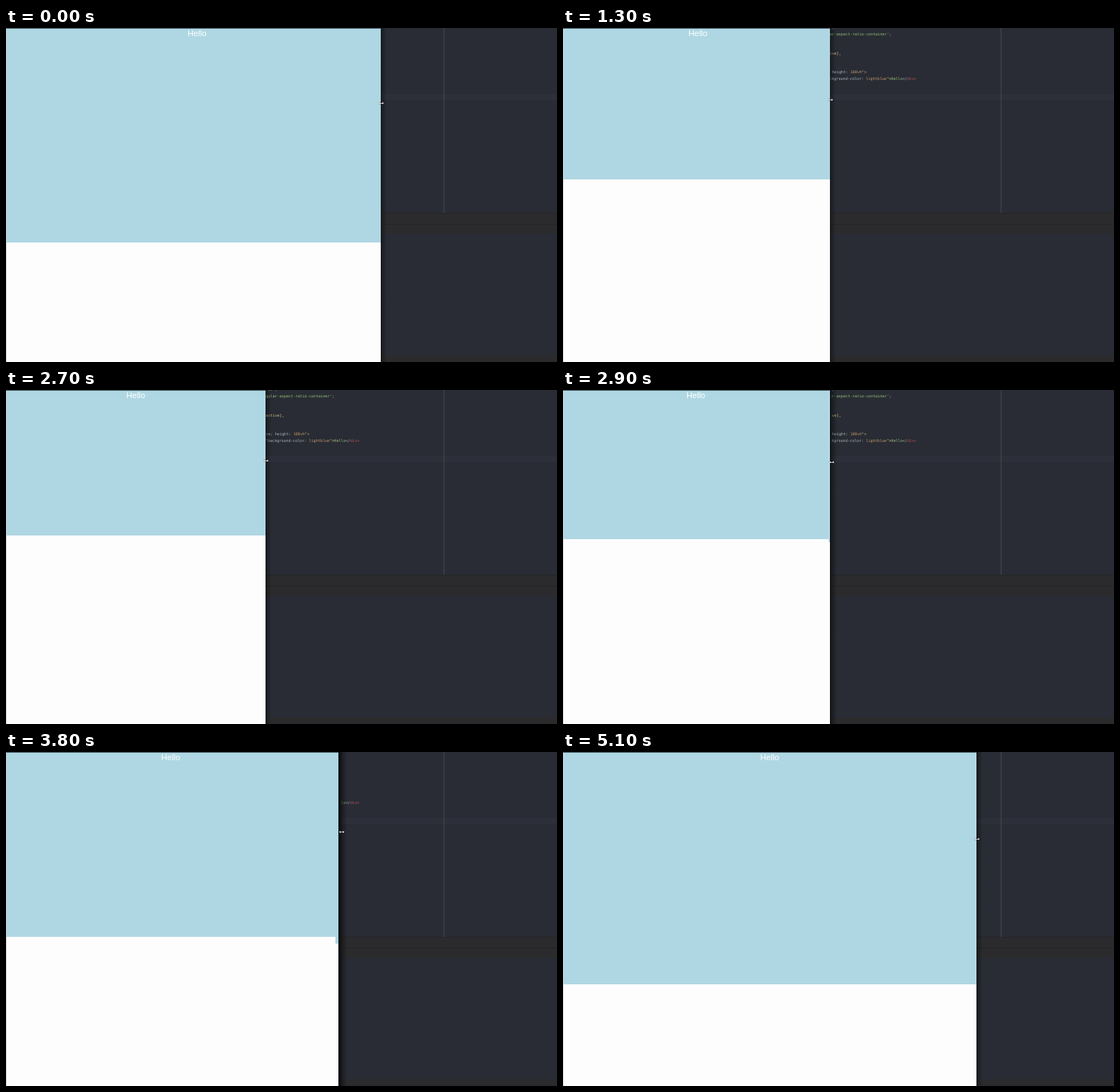
An HTML page with a canvas for the animation above (5.2 s loop, 741 by 450 pixels).

```html
<!DOCTYPE html>
<html>
<head>
<meta charset="utf-8">
<style>
  html, body { margin: 0; overflow: hidden; }
  canvas { display: block; }
</style>
</head>
<body>
<canvas id="stage" width="741" height="450"></canvas>
<script>
const ctx = document.getElementById('stage').getContext('2d');
const LOOP = 5200, STEP = 100;

// [time, x] of the page edge and [time, y] of the pointer
const edgeKeys = [[-100, 514], [0, 504], [400, 458], [500, 446], [1000, 387], [1200, 363], [1300, 359],
  [1500, 353], [1800, 349], [2700, 349], [3000, 364], [3300, 387], [3600, 424], [4200, 493],
  [4300, 497], [4800, 546], [5000, 555.5], [5100, 556]];
const pointerKeys = [[0, 101], [500, 102], [1300, 96.5], [1800, 95], [2700, 95], [3300, 101], [4300, 114], [5100, 117]];

const GREY = '#abb2bf', GREEN = '#98c379', ORANGE = '#c59a6c', YELLOW = '#d9c08a', RED = '#b8525c';
// Each line: right end, vertical centre, then coloured parts
const code = [
  [364.5, -0.5, ["or';", GREEN]],
  [441.7, 8.3, ["gular-aspect-ratio-container'", GREEN], [';', GREY]],
  [374, 33.8, ['active],', YELLOW]],
  [408, 59.2, ['ve; height: ', GREY], ['100vh', ORANGE], ['">', YELLOW]],
  [475.3, 68, ['"', GREEN], ['background-color: ', GREY], ['lightblue', ORANGE], ['">', YELLOW], ['Hello', GREEN], ['</', GREY], ['div>', RED]]
];

function at(keys, t) {
  const i = keys.findIndex(k => k[0] >= t);
  if (i < 0) return keys[keys.length - 1][1];
  if (i === 0) return keys[0][1];
  const [t0, a] = keys[i - 1], [t1, b] = keys[i];
  return a + (b - a) * (t - t0) / (t1 - t0);
}

function rect(color, x, y, w, h) {
  ctx.fillStyle = color;
  ctx.fillRect(x, y, w, h);
}

function drawEditor() {
  rect('#292c34', 0, 0, 741, 450);
  rect('#2d2f3a', 0, 89, 741, 8);
  rect('#484a50', 588.6, 0, 1, 249);
  rect('#2b2b2d', 0, 249, 741, 28);
  rect('#242527', 0, 249, 741, 1);
  rect('#232426', 0, 264, 741, 1);
  rect('#2b2b2d', 0, 441, 741, 9);
  ctx.font = '5.13px "DejaVu Sans Mono", monospace';
  ctx.textAlign = 'right';
  ctx.textBaseline = 'alphabetic';
  for (const [right, y, ...parts] of code) {
    let x = right;
    for (const [text, color] of parts.reverse()) {
      ctx.fillStyle = color;
      ctx.fillText(text, x, y + 1.8);
      x -= ctx.measureText(text).width;
    }
    parts.reverse();
  }
}

function drawPage(edge, growth) {
  const gap = growth > 0 ? growth * 0.35 : growth;
  const content = edge - gap, height = content * 9 / 16;
  const frame = edge + Math.max(0, gap);

  const shadow = ctx.createLinearGradient(frame, 0, frame + 8, 0);
  shadow.addColorStop(0, 'rgba(0,0,0,.4)');
  shadow.addColorStop(1, 'rgba(0,0,0,0)');
  rect(shadow, frame, 0, 8, 450);
  rect('#101316', edge, 0, frame - edge, 450);

  rect('#fefdfe', 0, 0, edge, 450);
  rect('#afd7e3', 0, 0, Math.min(content, edge), Math.round(height));
  if (gap > 0) rect('#afd7e3', content, 0, gap, height + gap * 2.3);
  rect('#c9cccd', 0, 1, 0.7, 449);
  rect('#45565d', 0, 0, edge, 1);

  ctx.font = '11.1px "Liberation Sans", Arial, sans-serif';
  ctx.textAlign = 'center';
  ctx.fillStyle = '#fff';
  ctx.fillText('Hello', content / 2, 11);
}

function drawPointer(x, y) {
  const arrow = new Path2D('M-3.5 0L-1.7 -1.5V-.4H1.7V-1.5L3.5 0L1.7 1.5V.4H-1.7V1.5Z');
  ctx.save();
  ctx.translate(x, y);
  ctx.strokeStyle = 'rgba(20,24,28,.6)';
  ctx.lineWidth = 0.8;
  ctx.stroke(arrow);
  ctx.fillStyle = '#fff';
  ctx.fill(arrow);
  ctx.restore();
}

function draw(now) {
  const t = Math.floor(now % LOOP / STEP) * STEP;
  const edge = at(edgeKeys, t), growth = edge - at(edgeKeys, t - STEP);
  drawEditor();
  drawPage(edge, growth);
  drawPointer(edge + 0.5 + Math.max(0, growth) * 0.35, at(pointerKeys, t) + 0.3);
  requestAnimationFrame(draw);
}

const start = performance.now();
const tick = draw;
draw = now => tick(Math.max(0, now - start));
draw(start);
</script>
</body>
</html>
```
